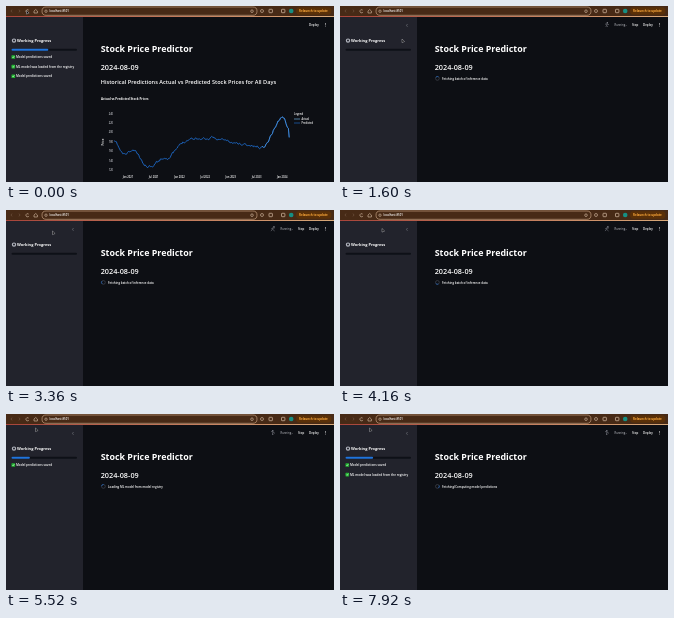
Recreate the animation shown at these times as an HTML page with a canvas. Size 328 by 176 pixels, loop 8 s.

```html
<!DOCTYPE html>
<html lang="en">
<head>
<meta charset="utf-8">
<title>Stock Price Predictor</title>
<style>
html, body { margin: 0; width: 100%; height: 100%; overflow: hidden; background: #0d0f14; }
canvas { display: block; }
</style>
</head>
<body>
<canvas width="328" height="176"></canvas>
<script>
const c = document.querySelector('canvas').getContext('2d');
const LOOP = 8000, RELOAD = 480, FETCHED = 4880, LOADED = 7440;
const WHITE = '#fff', BLUE = '#2074dc', DIM = '#8b8d95', TAN = '#d9bfa8';
const ease = u => u * u * (3 - 2 * u);

function text(s, x, y, size, weight = 600, color = WHITE, align = 'left') {
  c.font = `${weight} ${size}px "Open Sans", "Noto Sans", sans-serif`;
  c.fillStyle = color;
  c.textAlign = align;
  c.fillText(s, x, y);
}
function box(x, y, w, h, r, fill, stroke) {
  c.beginPath();
  c.roundRect(x, y, w, h, r);
  if (fill) { c.fillStyle = fill; c.fill(); }
  if (stroke) { c.strokeStyle = stroke; c.lineWidth = 0.7; c.stroke(); }
}
function line(points, color, width = 0.6) {
  c.beginPath();
  points.forEach(([x, y]) => c.lineTo(x, y));
  c.strokeStyle = color;
  c.lineWidth = width;
  c.stroke();
}
function arc(x, y, r, color, from = 0, to = Math.PI * 2, width = 0.6) {
  c.beginPath();
  c.arc(x, y, r, from, to);
  c.strokeStyle = color;
  c.lineWidth = width;
  c.stroke();
}
function dot(x, y, r, color) {
  c.beginPath();
  c.arc(x, y, r, 0, Math.PI * 2);
  c.fillStyle = color;
  c.fill();
}
// Arrow head pointing left (dir -1) or right (dir 1)
function chevron(x, y, dir, color) {
  line([[x - dir, y - 1.4], [x, y], [x - dir, y + 1.4]], color, 0.5);
}
// Eased value at t between key points [t, ...values]
function follow(keys, t) {
  const i = Math.max(1, keys.findIndex(k => k[0] >= t));
  const [a, b] = [keys[i - 1], keys[i]];
  const e = ease((t - a[0]) / (b[0] - a[0]));
  return a.slice(1).map((v, n) => v + (b[n + 1] - v) * e);
}

// Price curve: main turns plus a seeded wandering noise
const turns = [[108, 136], [118, 149], [127, 145], [141, 160], [160, 151], [185, 132],
  [212, 133], [232, 138], [256, 141], [277, 111], [282, 120], [284, 138]];
let seed = 11, drift = 0;
const random = () => (seed = seed * 16807 % 2147483647) / 2147483647;
const prices = [];
for (let x = 108; x <= 284; x += 0.8) {
  drift = drift * 0.8 + (random() - 0.5) * 2.4;
  prices.push([x, follow(turns, x)[0] + drift]);
}

function chart() {
  text('Historical Predictions Actual vs Predicted Stock Prices for All Days', 94.7, 77.5, 5.58);
  text('Actual vs Predicted Stock Prices', 95, 94, 3, 700);
  for (let i = 0; i < 7; i++) {
    text(240 - i * 20, 107, 108.5 + i * 9.4, 2.5, 600, '#c5c7cd', 'right');
    text((i % 2 ? 'Jul ' : 'Jan ') + (2021 + (i >> 1)), 122 + i * 25.7, 171.5, 2.6, 600, WHITE, 'center');
  }
  c.save();
  c.translate(98, 136);
  c.rotate(-Math.PI / 2);
  text('Price', 0, 0, 2.9, 600, WHITE, 'center');
  c.restore();
  line(prices, BLUE, 0.8);
  line(prices.filter(p => p[0] > 256), '#5aa5ec', 0.6);
  text('Legend', 288, 109, 2.6);
  [['Actual', '#83c9ff'], ['Predicted', BLUE]].forEach(([name, color], i) => {
    const y = 113 + i * 4;
    line([[288, y], [294, y]], color);
    text(name, 295.5, y + 1, 2.5);
  });
}

function browser() {
  box(0, 0, 328, 10.5, 0, '#472a16');
  const edge = c.createLinearGradient(0, 0, 328, 0);
  edge.addColorStop(0, '#a8443a');
  edge.addColorStop(1, '#d8a878');
  box(0, 10, 328, 1, 0, edge);
  chevron(5, 5, -1, '#806450');
  chevron(14, 5, 1, '#806450');
  arc(21.5, 5.3, 1.6, TAN, 0.4, 5.6);
  line([[28, 5], [29.7, 3.5], [31.4, 5], [31.4, 7], [28, 7], [28, 5]], TAN);
  box(36, 1, 215, 8.3, 4.1, '', '#c4a080');
  arc(40, 5.2, 1.2, TAN);
  text('localhost:8501', 43.5, 6.3, 2.8);
  arc(246, 5.2, 1.3, TAN);
  arc(256, 5, 1.5, TAN);
  [263, 275.5].forEach(x => box(x, 3.3, 3.4, 3.4, 0.6, '', TAN));
  dot(285.2, 5, 2.3, '#168f83');
  box(290, 1.3, 35.5, 7.5, 3.7, '#5a3008');
  text('Relaunch to update', 293, 6.2, 2.95, 700, '#ffab3c');
}

function sidebar(done, running) {
  box(0, 11, 77, 165, 0, '#22232c');
  arc(8, 34.6, 1.6, '#b2b5be', 0, 7, 1.2);
  text('Working Progress', 11, 36.3, 3.95, 700);
  if (running) chevron(66.5, 19.4, -1, DIM);
  box(5.5, 42.8, 65.5, 2, 1, '#0e1017');
  if (done) box(5.5, 42.8, 9.2 * (done + 1), 2, 1, BLUE);
  ['Model predictions saved', 'ML model was loaded from the registry', 'Model predictions saved']
    .slice(0, done).forEach((s, i) => {
      const y = 51 + i * 9.6;
      box(5.5, y - 1.8, 3.6, 3.6, 0.6, '#20b52f');
      line([[6.4, y], [7.1, y + 0.8], [8.3, y - 0.9]], WHITE, 0.5);
      text(s, 10, y + 1.2, 3.08);
    });
}

// Small figure that swings its arms and legs
function athlete(t) {
  const s = Math.sin(t / 130);
  dot(267.5 + s * 0.7, 16.7, 0.7, DIM);
  line([[265.5 - s, 21], [266.7, 19.4], [268 + s, 21]], DIM, 0.5);
  line([[265, 18.5 + s], [267, 17.8], [269, 18.5 - s]], DIM, 0.5);
  line([[267, 17.8], [266.7, 19.4]], DIM, 0.5);
}

function status(t, done) {
  const label = ['Fetching batch of inference data', 'Loading ML model from model registry',
    'Fetching/Computing model predictions'][done];
  const a = t / 1000 * Math.PI * 2;
  athlete(t);
  text('Running...', 274.5, 20, 2.75, 400, '#c9cbd1');
  text('Stop', 292, 20, 2.9);
  arc(97.4, 72.4, 1.9, '#4a4d58');
  arc(97.4, 72.4, 1.9, BLUE, a, a + 1.6);
  text(label, 102, 73.6, 2.95);
}

const path = [[0, 20.5, 4.5], [800, 21, 6], [1600, 62, 33], [2560, 51, 23.5],
  [4160, 42, 18.5], [5280, 29.5, 14], [LOOP, 29.5, 14]];
function cursor(t) {
  const [x, y] = follow(path, t);
  c.beginPath();
  c.moveTo(x, y);
  c.lineTo(x, y + 3.6);
  c.lineTo(x + 2.6, y + 2.5);
  c.closePath();
  c.fillStyle = '#08080a';
  c.fill();
  c.strokeStyle = '#c4c5ca';
  c.lineWidth = 0.45;
  c.stroke();
}

function draw(now) {
  const t = Math.floor(now % LOOP / 80) * 80;
  const running = t >= RELOAD;
  const done = !running ? 3 : t < FETCHED ? 0 : t < LOADED ? 1 : 2;
  box(0, 0, 328, 176, 0, '#0d0f14');
  sidebar(done, running);
  browser();
  text('Deploy', 303, 20, 2.95);
  for (let i = 0; i < 3; i++) dot(319.6, 17.5 + i * 1.3, 0.45, WHITE);
  text('Stock Price Predictor', 94.7, 46.2, 8.9, 700);
  text('2024-08-09', 94.7, 64.2, 7.3);
  if (running) status(t, done);
  else chart();
  cursor(t);
  requestAnimationFrame(draw);
}
requestAnimationFrame(draw);
</script>
</body>
</html>
```
